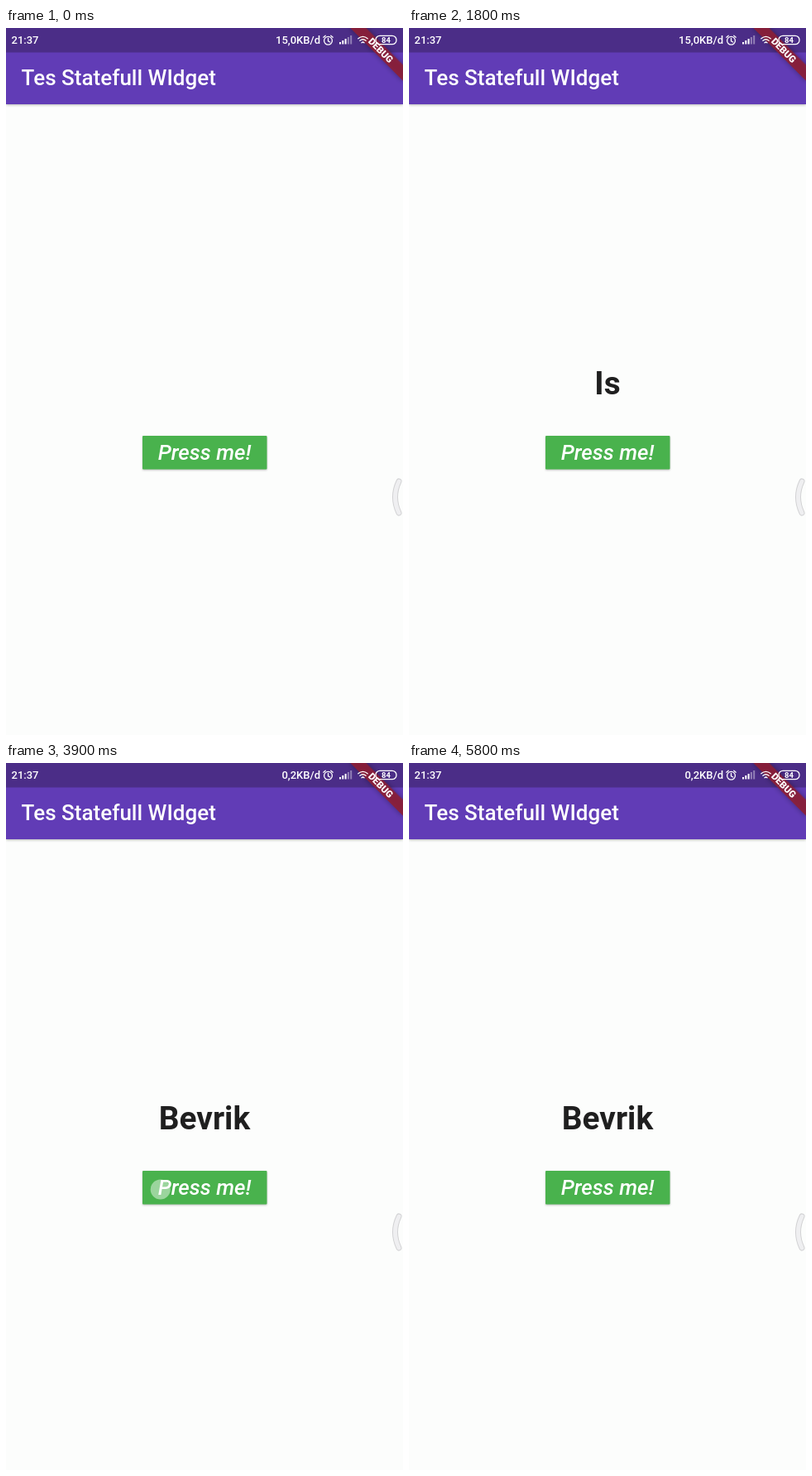
An HTML page for the animation above (5.9 s loop, 480 px wide and 853 px high).

```html
<!DOCTYPE html>
<html lang="en">
<head>
<meta charset="utf-8">
<title>Press me</title>
<style>
  html, body { margin: 0; width: 100%; height: 100%; overflow: hidden; background: #fcfdfc; }
  svg { display: block; width: 480px; height: 853px; font-family: Roboto, sans-serif; }
  text { fill: #fff; }
  .bar { filter: drop-shadow(0 1px 1.5px rgba(0, 0, 0, .28)); }
  .title { font-size: 26px; font-weight: 500; }
  .status { font-size: 13px; font-weight: 500; }
  .line { fill: none; stroke: #fff; stroke-width: 1.3; stroke-linecap: round; }
  .word { font-size: 38.8px; font-weight: 700; fill: #1f1f1f; text-anchor: middle; }
  .label { font-size: 25.9px; font-weight: 500; font-style: italic; text-anchor: middle; }
  .banner { font-size: 11.5px; font-weight: 900; text-anchor: middle; }
  .band { fill: #8c1f38; fill-opacity: .92; filter: drop-shadow(0 0 3px rgba(0, 0, 0, .4)); }
  .button { fill: #49b24d; filter: drop-shadow(0 1px 1px rgba(0, 0, 0, .25)); }
  .raised { filter: drop-shadow(0 3px 2.5px rgba(0, 0, 0, .38)); }
</style>
</head>
<body>
<svg viewBox="0 0 480 853">
  <defs>
    <clipPath id="buttonClip"><rect x="165" y="492" width="150.5" height="40.5" rx="1"/></clipPath>
  </defs>
  <rect width="480" height="853" fill="#fcfdfc"/>

  <g class="bar"><rect width="480" height="92" fill="#613cb6"/></g>
  <rect width="480" height="29.5" fill="#4b2d87"/>
  <text class="title" x="18.6" y="69">Tes Statefull WIdget</text>

  <text class="word" id="word" x="240" y="442"></text>

  <rect class="button" id="button" x="165" y="492" width="150.5" height="40.5" rx="1"/>
  <g clip-path="url(#buttonClip)">
    <circle id="splash" cx="188" cy="515"/>
  </g>
  <text class="label" x="240" y="520.5">Press me!</text>
  <circle id="touch" r="12" fill="#fff"/>

  <!-- edge handle -->
  <g fill="none" stroke-linecap="round">
    <path d="M475 547Q466 566 475 585" stroke="#d2d2d4" stroke-width="7"/>
    <path d="M475 547Q466 566 475 585" stroke="#efeff1" stroke-width="5"/>
  </g>

  <!-- corner banner -->
  <g transform="translate(480 0) rotate(45)">
    <rect class="band" x="-45" y="31.5" width="90" height="13.5"/>
    <text class="banner" x="0" y="42.2">DEBUG</text>
  </g>

  <!-- status bar -->
  <g class="status">
    <text x="6.5" y="19">21:37</text>
    <text id="speed" x="380" y="19" text-anchor="end"></text>
  </g>
  <g class="line">
    <circle cx="389.5" cy="15.3" r="4.9"/>
    <path d="M389.5 12.5V15.8L391.7 17M383.8 11.2L386.2 9.2M392.8 9.2L395.2 11.2"/>
    <path d="M425.8 12.8Q431.5 8 437.2 12.8M427.9 15.3Q431.5 12.2 435.1 15.3M430 17.7Q431.5 16.4 433 17.7"/>
    <rect x="447" y="9.3" width="25" height="10.4" rx="5"/>
  </g>
  <path d="M403 17h2v2.5h-2zM406.3 15h2v4.5h-2zM409.6 13h2v6.5h-2z" fill="#fff"/>
  <path d="M412.9 11h2v8.5h-2zM416.2 9h2v10.5h-2z" fill="#fff" opacity=".4"/>
  <text x="459.5" y="18" font-size="9.5" font-weight="700" text-anchor="middle">84</text>
</svg>

<script>
  const LOOP = 5900, STEP = 100;
  const words = ["Bevrik", "Is", "Awesome"];
  const taps = [400, 1400, 2400, 3200, 3900, 4400, 5000];
  const $ = id => document.getElementById(id);

  function set(node, attrs) {
    for (const name in attrs) node.setAttribute(name, attrs[name]);
  }

  function draw(time) {
    const t = Math.floor(time % LOOP / STEP) * STEP;
    const done = taps.filter(tap => t >= tap + STEP).length;
    const last = taps.filter(tap => t >= tap).pop();
    const age = last === undefined ? Infinity : (t - last) / STEP;
    const touching = age < 2, splashing = age === 1 || age === 2;

    $("word").textContent = done ? words[(done - 1) % words.length] : "";
    $("speed").textContent = t < 2100 ? "15,0KB/d" : "0,2KB/d";
    $("button").classList.toggle("raised", splashing);
    set($("touch"), touching
      ? { cx: 186.7 + age, cy: 514.5 + 4 * age, opacity: .45 - .2 * age }
      : { opacity: 0 });
    set($("splash"), splashing
      ? { r: 27 + 50 * age, opacity: .15 - .05 * age }
      : { opacity: 0 });
  }

  function tick() {
    draw(performance.now());
    requestAnimationFrame(tick);
  }
  tick();
</script>
</body>
</html>
```
